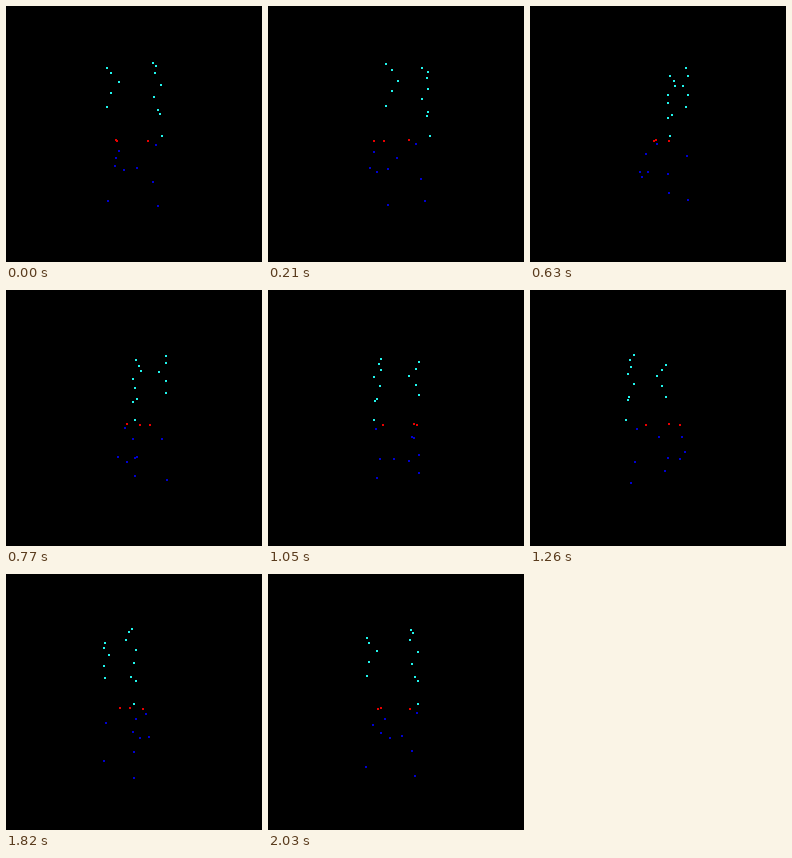
These frames come from a looping animation (256 px wide and 256 px high, 2100 ms). A matplotlib script:

```python
import numpy as np
import matplotlib.pyplot as plt
from matplotlib.animation import FuncAnimation

SIZE, DPI = 256, 100
FRAMES, STEP = 30, 70
CENTER = SIZE / 2
DEPTH = 215  # distance from eye to the turning axis
DOT = 2

CYAN, RED, BLUE = (32, 244, 236), (232, 0, 0), (0, 0, 208)


def strand(count, phase, radius, height):
    """Points (degrees, radius, height below eye) from rules of their index."""
    return [(phase(k), radius(k), height(k)) for k in range(count)]


def every_fourth(k):
    return 25 if k % 4 == 0 else 31


GROUPS = [
    # two upper columns, the right one ending in two lower points
    (CYAN, strand(6, lambda k: 43 - 4 * (k % 3) + 8 * (k > 2), every_fourth,
                  lambda k: -65 + 3.6 * k + k * k)
     + [(50.6, 30.5, -18.8), (47.7, 32.8, 1.5)]),
    (CYAN, strand(5, lambda k: -43 - 10 * np.cos(k * np.pi / 2),
                  lambda k: every_fourth(k + 2),
                  lambda k: -61 + 5 * k + k * k)),
    # belt
    (RED, strand(3, lambda k: (81, -76, -119)[k], lambda k: 14 + 4 * k,
                 lambda k: 6.1)),
    # back arc, right column and loose lower points
    (BLUE, strand(3, lambda k: -128 - 12 * k - 9 * k * k,
                  lambda k: 26.2 - 3.7 * k,
                  lambda k: 33.5 + 9.6 * k - 4 * k * k)),
    (BLUE, strand(2, lambda k: 47, lambda k: 24 + 4.6 * k,
                  lambda k: 44 + 21.4 * k)),
    (BLUE, [(77, 22, 10.3), (-136, 23.5, 17.9), (-36, 28.4, 20.6),
            (-50, 31.7, 60)]),
]
CLOUDS = [(color, np.array(points, float)) for color, points in GROUPS]


def project(points, turn):
    """Turn the points about the vertical axis and view them in perspective."""
    phase, radius, height = points.T
    angle = np.radians(phase + turn)
    scale = DEPTH / (DEPTH - radius * np.cos(angle))
    x = CENTER + radius * np.sin(angle) * scale
    y = CENTER + height * scale
    return np.floor(np.column_stack([x, y])).astype(int)


def render(i):
    canvas = np.zeros((SIZE, SIZE, 3), np.uint8)
    for color, points in CLOUDS:
        for x, y in project(points, 360 * i / FRAMES):
            canvas[y:y + DOT, x:x + DOT] = color
    return canvas


fig = plt.figure(figsize=(SIZE / DPI, SIZE / DPI), dpi=DPI, facecolor="black")
ax = fig.add_axes([0, 0, 1, 1])
ax.axis("off")
stage = ax.imshow(render(0), interpolation="nearest", aspect="auto")


def update(i):
    stage.set_data(render(i))
    return [stage]


anim = FuncAnimation(fig, update, frames=FRAMES, interval=STEP,
                     repeat=True, repeat_delay=0, blit=False)
plt.show()
```
